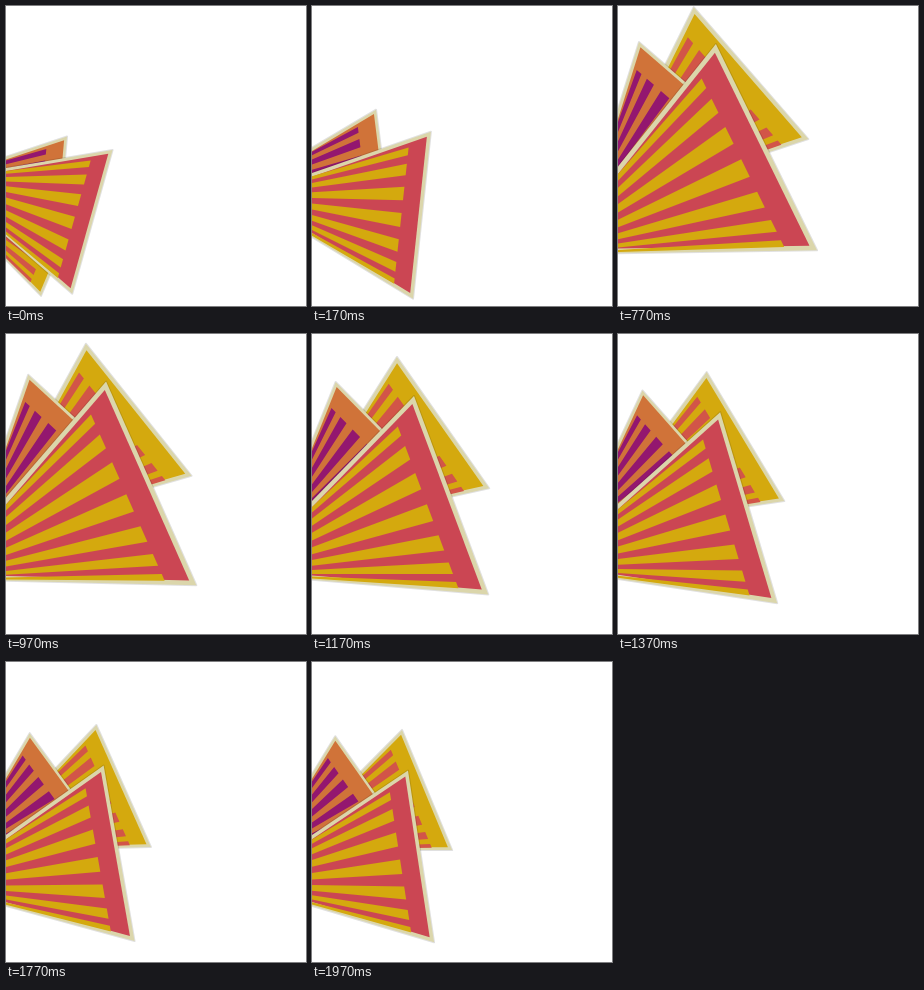
An HTML page for the animation above (2 s loop, 300 by 300 pixels).

```html
<!DOCTYPE html>
<html lang="en">
<head>
<meta charset="utf-8">
<title>Fanned pennants</title>
<style>
  html, body { margin: 0; width: 100%; height: 100%; overflow: hidden; background: #fff; }
  svg { display: block; width: 100vw; height: 100vh; }
</style>
</head>
<body>
<svg id="stage" viewBox="0 0 300 300"></svg>
<script>
const LOOP = 2000, FRAMES = 60;
const RISE_START = -1.5, PEAK = 19, SETTLE_END = 60; // in frames
const CREAM = '#dbd6ab', GOLD = '#d4a90e', RED = '#cb4653';
const INSET = .935;
const RAY_COUNT = 7, FIRST_RAY = 27.5, RAY_STEP = 20.8, RAY_WIDTH = 11; // degrees

const pose = (x, y, height, angle) => ({ x, y, height, angle });

// Back to front. Each pennant is an isosceles triangle placed by its apex,
// its height and the direction of its axis; spread is half its edge per height.
const pennants = [
  { field: GOLD, ray: '#d25548', spread: .417, rayLength: .885,
    folded: pose(-65, 188, 130, 24),
    open: pose(-25, 205, 211, -41.5),
    rest: pose(-29, 188, 156, -22.6) },
  { field: '#d07339', ray: '#93176f', spread: .435, rayLength: .86,
    folded: pose(-84, 178, 139, 6),
    open: pose(-31, 204, 162, -49.5),
    rest: pose(-52, 197, 132, -35) },
  { field: RED, ray: GOLD, spread: .472, rayLength: .885,
    folded: pose(-66, 172, 157, 16.3),
    open: pose(-70, 249, 245, -26.6),
    rest: pose(-73, 222, 184, -8.6) }
];

const stage = document.getElementById('stage');

function addPath(attributes) {
  const path = document.createElementNS('http://www.w3.org/2000/svg', 'path');
  for (const name in attributes) path.setAttribute(name, attributes[name]);
  return stage.appendChild(path);
}

for (const p of pennants) {
  p.border = addPath({ fill: CREAM, stroke: '#000', 'stroke-opacity': .12,
                       'stroke-width': 2, 'stroke-linejoin': 'round', 'paint-order': 'stroke' });
  p.inside = addPath({ fill: p.field });
  p.rays = addPath({ fill: p.ray });
}

const radians = degrees => degrees * Math.PI / 180;
const lerp = (a, b, k) => a + (b - a) * k;
const mix = (a, b, k) => [lerp(a[0], b[0], k), lerp(a[1], b[1], k)];
const distance = (a, b) => Math.hypot(a[0] - b[0], a[1] - b[1]);
const outline = points => 'M' + points.map(q => q.map(n => n.toFixed(2)).join(' ')).join('L') + 'Z';

function ease(from, to, frame) {
  const k = (frame - from) / (to - from);
  return k * k * (3 - 2 * k);
}

function poseAt(p, frame) {
  const rising = frame < PEAK;
  const [a, b] = rising ? [p.folded, p.open] : [p.open, p.rest];
  const k = rising ? ease(RISE_START, PEAK, frame) : ease(PEAK, SETTLE_END, frame);
  return pose(...Object.keys(a).map(key => lerp(a[key], b[key], k)));
}

function incenter(a, b, c) {
  const wa = distance(b, c), wb = distance(a, c), wc = distance(a, b);
  return [0, 1].map(i => (a[i] * wa + b[i] * wb + c[i] * wc) / (wa + wb + wc));
}

function drawPennant(p, frame) {
  const { x, y, height, angle } = poseAt(p, frame);
  const cos = Math.cos(radians(angle)), sin = Math.sin(radians(angle));
  // side runs from -1 to 1 across the fan, reach from apex to outer edge
  const place = (side, reach) => {
    const along = height * reach, across = along * p.spread * side;
    return [x + along * cos - across * sin, y + along * sin + across * cos];
  };
  const corners = [[x, y], place(-1, 1), place(1, 1)];
  const center = incenter(...corners);
  const rayEnd = degrees => place(-Math.cos(radians(degrees)), p.rayLength);
  const rays = Array.from({ length: RAY_COUNT }, (_, i) => {
    const from = FIRST_RAY + i * RAY_STEP;
    return outline([[x, y], rayEnd(from), rayEnd(from + RAY_WIDTH)]);
  });

  p.border.setAttribute('d', outline(corners));
  p.inside.setAttribute('d', outline(corners.map(q => mix(center, q, INSET))));
  p.rays.setAttribute('d', rays.join(''));
}

function draw(time) {
  const frame = Math.floor((time + 4) * FRAMES / LOOP) % FRAMES;
  for (const p of pennants) drawPennant(p, frame);
}

const start = performance.now();
function tick() {
  draw(performance.now() - start);
  requestAnimationFrame(tick);
}
tick();
</script>
</body>
</html>
```
